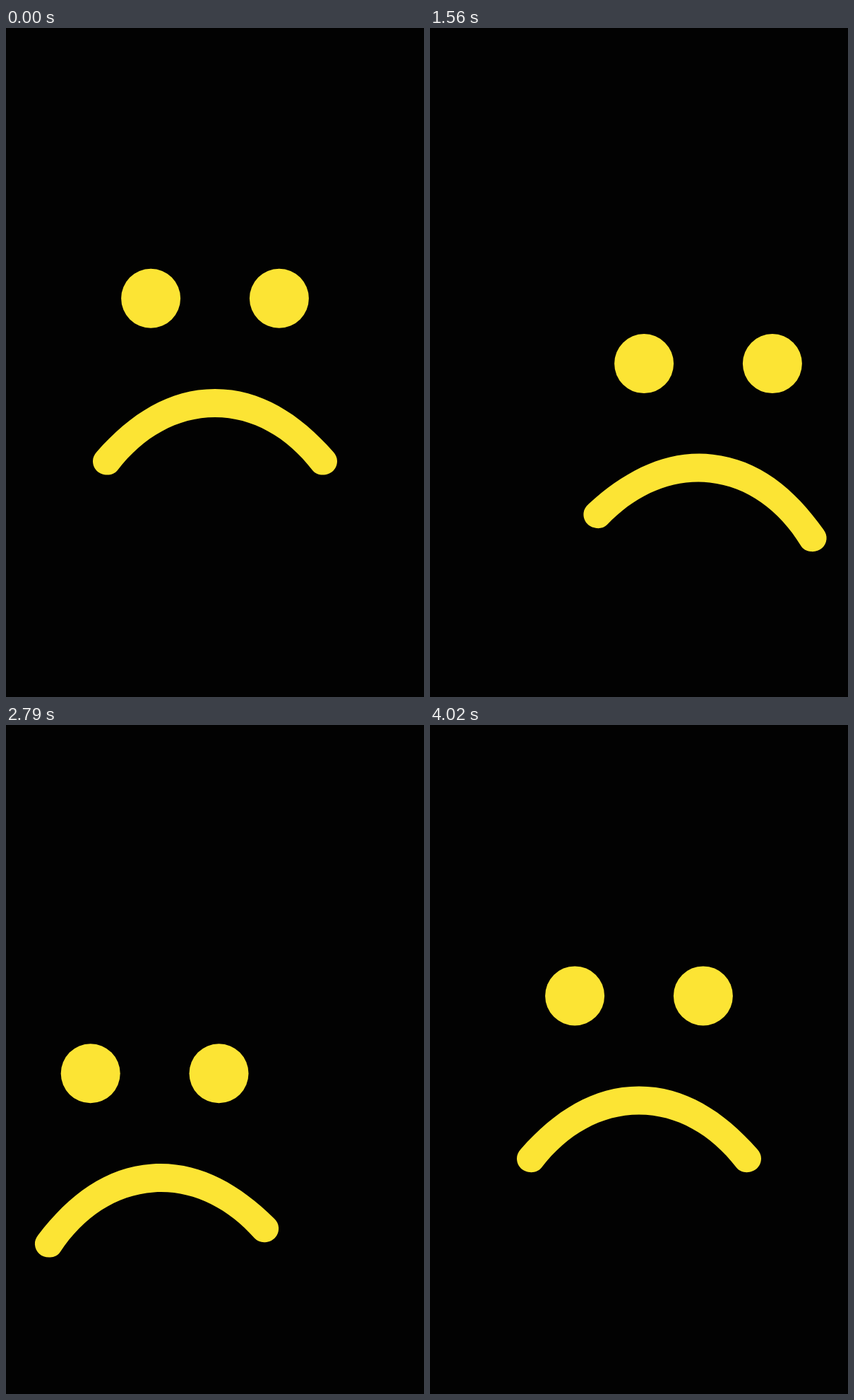
An HTML page with a canvas for the animation above (4380 ms loop, 592 by 947 pixels).

```html
<!DOCTYPE html>
<html lang="en">
<head>
<meta charset="utf-8">
<title>Sad face</title>
<style>
  html, body { margin: 0; width: 100%; height: 100%; overflow: hidden; background: #020202; }
  canvas { display: block; }
</style>
</head>
<body>
<canvas id="stage" width="592" height="947"></canvas>
<script>
const ctx = document.getElementById('stage').getContext('2d');
const LOOP = 4380, STEP = 30, BLACK = '#020202', YELLOW = '#fce434';
const PIVOT = [296, 571.7];

const smooth = u => u * u * (3 - 2 * u);
const easeIn = u => u ** 1.3;
const easeOut = u => 1 - easeIn(1 - u);
const mix = (a, b, u) => a + (b - a) * u;
const progress = (t, from, to) => Math.min(1, Math.max(0, (t - from) / (to - from)));

// The face rests at three places; x and y are offsets, tilt is the mouth's angle in degrees.
const rest = { x: 0, y: 0, tilt: 0 };
const right = { x: 98, y: 92.3, tilt: 6.2 };
const left = { x: -85.4, y: 110.4, tilt: -4.3 };
const home = { x: 0, y: 0.6, tilt: 0 };

// Each slide follows a Bezier path at an eased speed.
const slides = [
  { from: 417, to: 1295, path: [rest, { x: 47, y: 4 }, { x: 82, y: 48 }, right] },
  { from: 1812, to: 2731, path: [right, { x: 37, y: 77 }, { x: -40, y: 65 }, left] },
  { from: 3240, to: 4020, path: [left, { x: -76, y: 66 }, { x: -46, y: 2 }, home] }
];

const turns = [
  { from: 420, to: 1400, a: rest, b: right, ease: easeOut },
  { from: 1600, to: 2920, a: right, b: left, ease: smooth },
  { from: 3120, to: 4020, a: left, b: home, ease: easeIn }
];

const current = (list, t) => list.filter(m => t >= m.from).pop() || list[0];

function bezier([a, b, c, d], u) {
  const v = 1 - u;
  const at = k => v * v * v * a[k] + 3 * v * v * u * b[k] + 3 * v * u * u * c[k] + u * u * u * d[k];
  return { x: at('x'), y: at('y') };
}

// Point at a fraction of the path's length.
function along(path, fraction, n = 200) {
  const points = Array.from({ length: n + 1 }, (_, i) => bezier(path, i / n));
  const gap = i => Math.hypot(points[i + 1].x - points[i].x, points[i + 1].y - points[i].y);
  let total = 0;
  for (let i = 0; i < n; i++) total += gap(i);
  let left = total * fraction, i = 0;
  while (i < n - 1 && left > gap(i)) left -= gap(i++);
  const p = points[i], q = points[i + 1], f = left / gap(i);
  return { x: mix(p.x, q.x, f), y: mix(p.y, q.y, f) };
}

function offsetAt(t) {
  const m = current(slides, t);
  return along(m.path, smooth(progress(t, m.from, m.to)));
}

function tiltAt(t) {
  const m = current(turns, t);
  return mix(m.a.tilt, m.b.tilt, m.ease(progress(t, m.from, m.to)));
}

const mouth = new Path2D(`M128.5 600 C176 546 231 511 296 511
  C361 511 416 546 463.5 600 C467 604 469 608 469 613
  C469 624 460.5 632.6 448.5 632.6 C443 632.6 437.5 630.5 434 626
  C398 579 349 551 296 551 C243 551 194 579 158 626
  C154.5 630.5 149 632.6 143.5 632.6 C131.5 632.6 123 624 123 613
  C123 608 125 604 128.5 600 Z`);

function draw(t) {
  const { x, y } = offsetAt(t);
  ctx.setTransform(1, 0, 0, 1, 0, 0);
  ctx.fillStyle = BLACK;
  ctx.fillRect(0, 0, 592, 947);
  ctx.fillStyle = YELLOW;
  ctx.translate(x, y);
  for (const eye of [205.1, 386.9]) {
    ctx.beginPath();
    ctx.arc(eye, 382.8, 42, 0, Math.PI * 2);
    ctx.fill();
  }
  ctx.translate(...PIVOT);
  ctx.rotate(tiltAt(t) * Math.PI / 180);
  ctx.translate(-PIVOT[0], -PIVOT[1]);
  ctx.fill(mouth);
}

const start = performance.now();
function tick() {
  const t = (performance.now() - start) % LOOP;
  draw(Math.floor(t / STEP) * STEP);
  requestAnimationFrame(tick);
}
tick();
</script>
</body>
</html>
```
